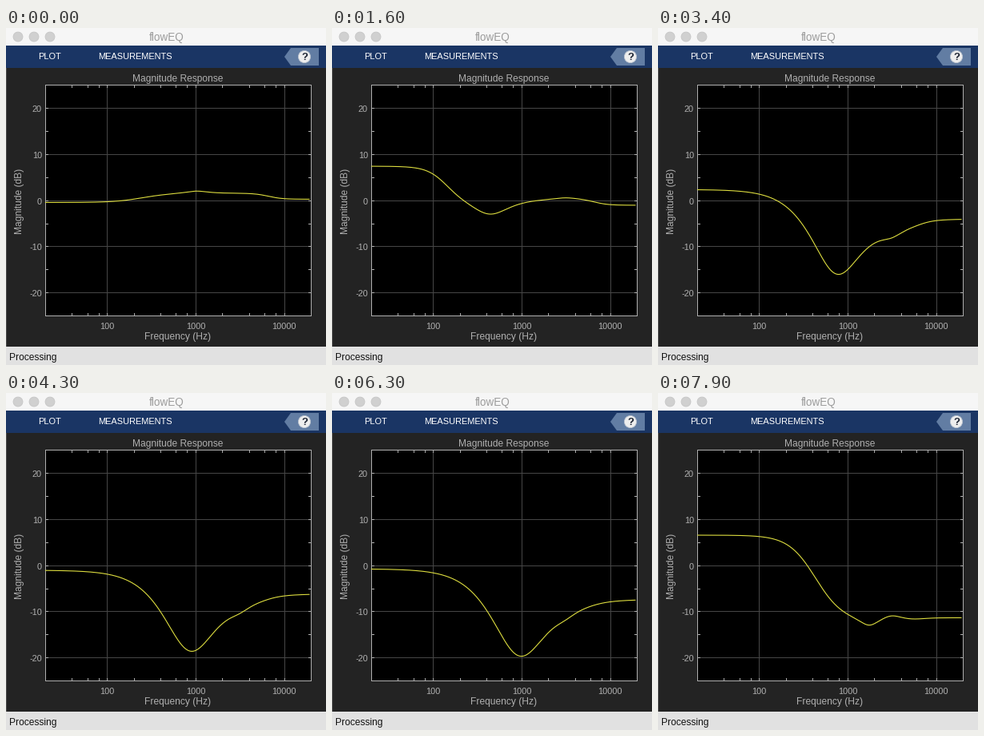
Animation of 400 by 422 pixels, one loop 8000 ms. Source, as a matplotlib script:

```python
import numpy as np
import matplotlib.pyplot as plt
from matplotlib.animation import FuncAnimation
from matplotlib.patches import Circle, Polygon, Rectangle

W, H, DPI = 400, 422, 100
FRAMES, INTERVAL = 80, 100
PT = 72 / DPI

# Plot box in stage pixels, y pointing down
LEFT, RIGHT, TOP, BOTTOM = 49.5, 381.5, 71.65, 360.65
GREY, GRID = "#afafaf", "#464646"

# Spans of frames in which the equaliser is being adjusted (inclusive)
ACTIVE = [(5, 25), (27, 29), (32, 44), (46, 47), (49, 49), (63, 74), (76, 79)]

# Equaliser settings after a number of adjustments. Frequencies in Hz,
# gains in dB, widths in decades:
# step, (shelf freq, width), (mid, high level), (bell gain, freq, width), presence
SETTINGS = [
    (0, (245, 0.16), (1.6, 0.3), (0.5, 1010, 0.11), 0),
    (6, (140, 0.11), (0.5, -0.15), (-0.9, 388, 0.18), 0.65),
    (18, (137, 0.11), (0.25, -1.85), (-5.85, 488, 0.2), 0),
    (27, (372, 0.2), (-5.2, -4), (-12.1, 739, 0.235), -1.3),
    (41, (458, 0.2), (-7.7, -7.3), (-13.1, 929, 0.26), -0.8),
    (56, (430, 0.155), (-12, -11.3), (-1.5, 1735, 0.09), 1.2),
]

# The bass level is swept separately: (step, dB)
BASS = [(0, -0.4), (6, 4.2), (13, 8), (18, 7.4), (21, 7.3), (27, 2.4),
        (36, -1), (40, -2.1), (41, -0.7), (49, 5.7), (56, 6.6)]

FREQ = np.geomspace(20, 19000, 400)


def steps_done(frame):
    return sum(max(0, min(frame, b) - a + 1) for a, b in ACTIVE)


def blend(step, steps, values):
    return np.interp(step, steps, values)


def settings_at(step):
    steps = [s[0] for s in SETTINGS]
    rows = [(np.log10(sf), sw, mid, high, g, np.log10(f), w, p)
            for _, (sf, sw), (mid, high), (g, f, w), p in SETTINGS]
    return [blend(step, steps, col) for col in zip(*rows)]


def rise(u, center, width):
    return 1 / (1 + np.exp((center - u) / width))


def bell(u, center, width):
    return 1 / np.cosh((u - center) / width)


def response(step):
    """Magnitude in dB: two shelves plus a main and a presence bell."""
    u = np.log10(FREQ)
    shelf, shelf_w, mid, high, gain, center, width, presence = settings_at(step)
    bass = blend(step, *zip(*BASS))
    db = bass + (mid - bass) * rise(u, shelf, shelf_w)
    db += (high - mid) * rise(u, np.log10(6570), 0.08)
    db += gain * bell(u, center, width)
    return db + presence * bell(u, np.log10(3100), 0.11)


def x_of(freq):
    return LEFT + (RIGHT - LEFT) / 3 * np.log10(freq / 20)


def y_of(db):
    return (TOP + BOTTOM) / 2 - db * (BOTTOM - TOP) / 50


fig = plt.figure(figsize=(W / DPI, H / DPI), dpi=DPI, facecolor="#232323")
ax = fig.add_axes([0, 0, 1, 1])
ax.set_xlim(0, W)
ax.set_ylim(H, 0)
ax.axis("off")


def rect(x, y, w, h, color):
    ax.add_patch(Rectangle((x, y), w, h, fc=color, ec="none", lw=0))


def hline(y, x0, x1, color):
    rect(np.floor(x0), np.floor(y), np.floor(x1) - np.floor(x0) + 1, 1, color)


def vline(x, y0, y1, color):
    rect(np.floor(x), np.floor(y0), 1, np.floor(y1) - np.floor(y0) + 1, color)


def label(x, y, s, size, color=GREY, ha="center", **kw):
    kw.setdefault("va", "baseline")
    ax.text(x, y, s, fontsize=size * PT, color=color, ha=ha,
            family="Liberation Sans", **kw)


def draw_window():
    rect(0, 0, W, 22, "#f6f6f6")
    for x in (15, 35, 55):
        ax.add_patch(Circle((x, 11), 6, fc="#d0d0d0", ec="#c2c2c2", lw=0.5))
    label(200.5, 16, "flowEQ", 13.5, "#9c9c9c")

    rect(0, 22, W, 28, "#1a3564")
    label(40, 39, "PLOT", 11, "white", "left")
    label(115, 39, "MEASUREMENTS", 11, "white", "left")
    ax.add_patch(Polygon([(348, 36), (356, 25), (391, 25), (391, 47), (356, 47)],
                         fc="#627da3", ec="none"))
    ax.add_patch(Circle((373, 36), 7.6, fc="#eeeeee", ec="#b9c2cf", lw=0.6))
    label(373, 40.5, "?", 13, "#1c2433", weight="bold")

    rect(0, 50, 1, 349, "#4a4a4a")
    rect(0, 399, W, 23, "#e1e1e1")
    label(4, 416, "Processing", 12, "#111111", "left")


def draw_plot():
    rect(LEFT, TOP, RIGHT - LEFT, BOTTOM - TOP, "black")
    for db in range(-20, 21, 10):
        hline(y_of(db), LEFT, RIGHT, GRID)
        label(45, y_of(db) + 4.4, str(db), 11, ha="right")
    for freq in (100, 1000, 10000):
        vline(x_of(freq), TOP, BOTTOM, GRID)
        label(x_of(freq) - 0.5, 377, str(freq), 11)

    for db in range(-20, 21, 5):
        hline(y_of(db), LEFT, LEFT + 3, GREY)
        hline(y_of(db), RIGHT - 3, RIGHT, GREY)
    for decade in (10, 100, 1000, 10000):
        for m in (1, 2, 4, 6, 8):
            if 20 < m * decade < 20000:
                x = x_of(m * decade)
                vline(x, TOP, TOP + 3, GREY)
                vline(x, BOTTOM - 3, BOTTOM, GREY)
    for y in (TOP, BOTTOM):
        hline(y, LEFT, RIGHT, GREY)
    for x in (LEFT, RIGHT):
        vline(x, TOP, BOTTOM, GREY)

    label(215, 67, "Magnitude Response", 12)
    label(215, 390, "Frequency (Hz)", 12)
    label(17, 217, "Magnitude (dB)", 12, rotation=90, va="center")


draw_window()
draw_plot()
curve, = ax.plot([], [], color="#dfdf40", lw=1.1 * PT)


def update(frame):
    curve.set_data(x_of(FREQ), y_of(response(steps_done(frame))))
    return curve,


anim = FuncAnimation(fig, update, frames=FRAMES, interval=INTERVAL,
                     repeat=True, repeat_delay=0, blit=False)
plt.show()
```
